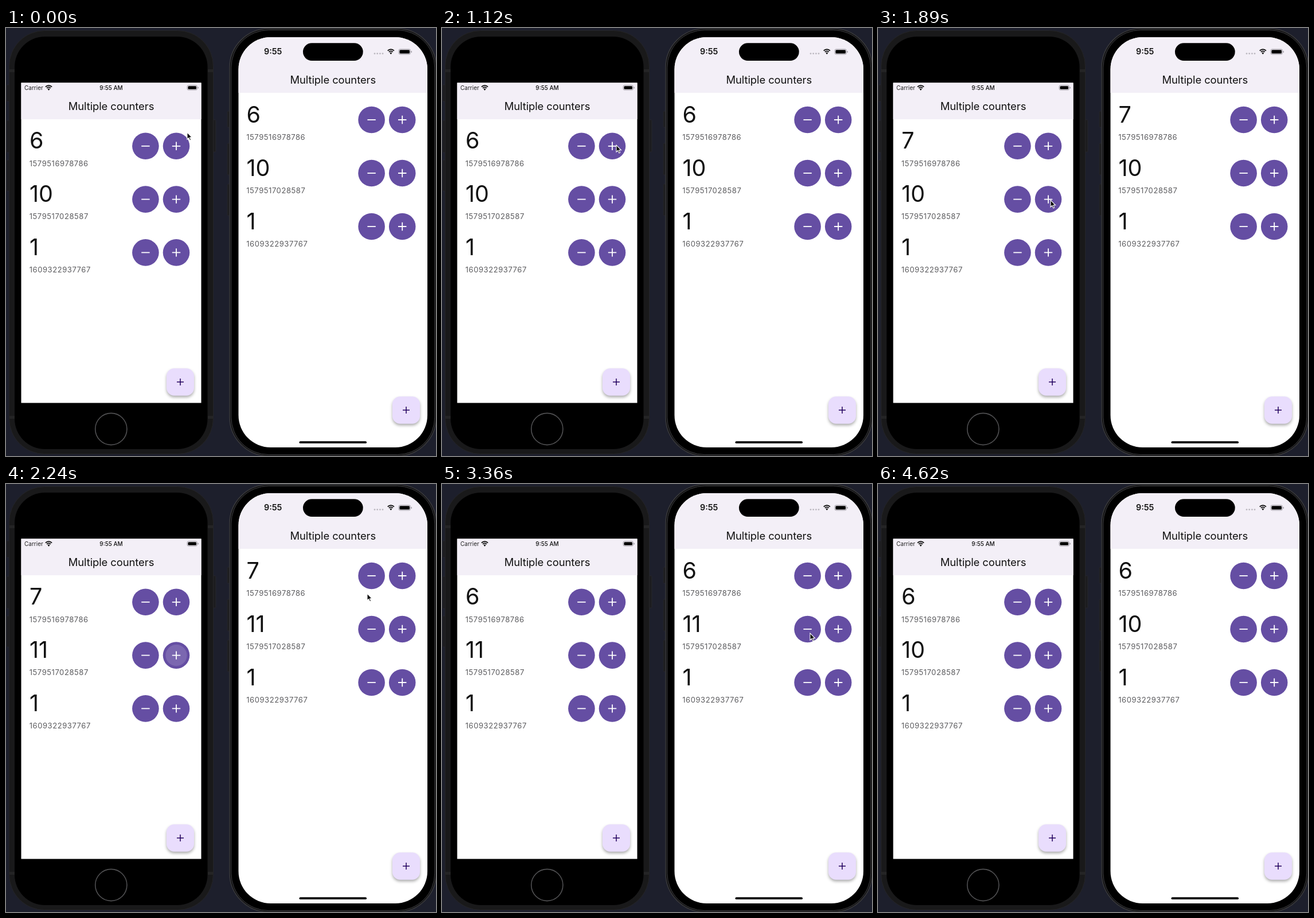
Recreate the animation shown at these times as an HTML page. Size 750 by 746 pixels, loop 4.69 s.

```html
<!DOCTYPE html>
<html lang="en">
<head>
<meta charset="utf-8">
<title>Multiple counters</title>
<style>
  html, body { margin: 0; width: 100%; height: 100%; overflow: hidden; background: #1d1f2c; }
  svg { display: block; width: 750px; height: 746px; font-family: Inter, sans-serif; fill: #111; }
  .title { font-size: 18.4px; text-anchor: middle; letter-spacing: -.07px; }
  .count { font-size: 39.5px; }
  .id { font-size: 13px; letter-spacing: .57px; fill: #5b5b5e; }
  .button { fill: #654ea3; }
  .ripple { fill: #fff; }
  .icon { fill: none; stroke: #fff; stroke-width: 1.8; }
  .fab { fill: #e9ddfd; filter: drop-shadow(0 3px 2.5px rgba(0, 0, 0, .32)); }
</style>
</head>
<body>
<svg id="stage" viewBox="0 0 750 746"></svg>
<script>
const LOOP = 4690, STEP = 70;
const ids = ['1579516978786', '1579517028587', '1609322937767'];
const start = [6, 10, 1];
const taps = [
  { time: 1230, phone: 0, row: 0, delta: 1 },
  { time: 2000, phone: 0, row: 1, delta: 1 },
  { time: 2800, phone: 1, row: 0, delta: -1 },
  { time: 3500, phone: 1, row: 1, delta: -1 },
];
// time, x, y
const path = [
  [140, 316, 182], [700, 304, 204], [1260, 304, 204], [1470, 300, 222],
  [1820, 301, 300], [2020, 301, 300], [2240, 630, 191], [2600, 647, 160],
  [2940, 647, 160], [3290, 642, 260], [3640, 642, 260], [4060, 770, 330],
];

const rect = (x, y, w, h, r, fill, extra = '') =>
  `<rect x="${x}" y="${y}" width="${w}" height="${h}" rx="${r}" fill="${fill}" ${extra}/>`;
const text = (cls, x, y, value, extra = '') =>
  `<text class="${cls}" x="${x}" y="${y}" ${extra}>${value}</text>`;

const wifi = (x, y) => `<g transform="translate(${x} ${y})">
  <path d="M-5.6-1.7A8 8 0 0 1 5.6-1.7M-3.4.5A4.9 4.9 0 0 1 3.4.5" fill="none" stroke="#111" stroke-width="1.9"/>
  <path d="M0 4.6L-2 2.1A3 3 0 0 1 2 2.1Z"/></g>`;

const battery = (x, y, w, h) =>
  rect(x, y, w, h, 2.6, 'none', 'stroke="#98959c" stroke-width=".9"') +
  rect(x + 1.4, y + 1.4, w - 2.8, h - 2.8, 1.5, '#000') +
  rect(x + w + 1, y + h / 2 - 1.5, 1.3, 3, .6, '#98959c');

const roundButton = (phone, row, x, y, sign) => `<g transform="translate(${x} ${y})">
  <circle class="button" r="23.3"/>
  <circle class="ripple" id="ripple${phone}${row}${sign}" r="0"/>
  <path class="icon" d="M-7.2 0H7.2${sign > 0 ? 'M0-7.2V7.2' : ''}"/></g>`;

const row = (phone, i, textX, buttonX, y) =>
  text('count', textX, y + 4.5, start[i], `id="count${phone}${i}"`) +
  text('id', textX - .3, y + 34.7, ids[i]) +
  roundButton(phone, i, buttonX, y, -1) +
  roundButton(phone, i, buttonX + 53.6, y, 1);

const rows = (phone, textX, buttonX, y, pitch) =>
  ids.map((_, i) => row(phone, i, textX, buttonX, y + i * pitch)).join('');

const fab = (x, y) => rect(x - 24, y - 23.7, 48, 47.4, 13.5, '#e9ddfd', 'class="fab"') +
  `<path d="M${x - 6} ${y}h12m-6-6v12" fill="none" stroke="#21005d" stroke-width="1.5"/>`;

const sideButton = (x, y, h) => rect(x, y, 5, h, 1.5, '#1c1c1f', 'stroke="#2c2c31" stroke-width=".7"');

const leftPhone =
  sideButton(1, 99, 29) + sideButton(1, 161, 56) + sideButton(1, 230, 54) + sideButton(361, 160, 56) +
  rect(5.5, 4.5, 356, 738, 62, '#19191a', 'stroke="#252527"') +
  [72, 676].map(y => rect(6, y, 9, 5, 0, '#242425') + rect(352, y, 9, 5, 0, '#242425')).join('') +
  rect(15, 15, 336.5, 719, 53, '#000') +
  rect(26.5, 95.5, 314, 558, 0, '#fff') +
  rect(26.5, 95.5, 314, 63.5, 0, '#f3eff7') +
  text('', 32, 108, 'Carrier', 'font-size="10" fill="#222"') + wifi(74.5, 104.3) +
  text('', 183.5, 108, '9:55 AM', 'font-size="10" font-weight="500" text-anchor="middle"') +
  battery(316, 99.8, 17.5, 8.4) +
  text('title', 183.5, 142.7, 'Multiple counters') +
  rows(0, 41, 243.4, 205.8, 92.8) + fab(304, 617) +
  `<circle cx="183.3" cy="699" r="27.6" fill="#000" stroke="#505052" stroke-width="1.6"/>`;

const rightPhone =
  sideButton(386, 145, 28) + sideButton(386, 201, 55) + sideButton(386, 272, 55) +
  rect(390, 1, 360.5, 745, 68, '#101011', 'stroke="#38383b" stroke-width="1.6"') +
  rect(392.8, 3.6, 355, 740, 65.5, '#000', 'stroke="#454548" stroke-width=".9"') +
  `<clipPath id="screen">${rect(405.5, 16, 329.5, 715, 56, '#fff')}</clipPath>` +
  `<g clip-path="url(#screen)">${rect(405, 16, 331, 716, 0, '#fff')}${rect(405, 16, 331, 97, 0, '#f3eff7')}</g>` +
  rect(518, 26.3, 104.7, 30.6, 15.3, '#000') +
  text('', 450, 46.4, '9:55', 'font-size="14.4" font-weight="600"') +
  [643, 647.7, 652.4, 657].map(x => `<circle cx="${x}" cy="44.6" r="1.4" fill="#bab7bf"/>`).join('') +
  wifi(671.3, 41.3) + battery(685, 36.9, 20.5, 9) +
  text('title', 570.3, 96.7, 'Multiple counters') +
  rows(1, 419.5, 637.6, 160, 93) + fab(698, 666) +
  rect(511.5, 720.3, 117.5, 3.8, 1.9, '#000');

const stage = document.getElementById('stage');
stage.innerHTML = rect(0, 0, 750, 746, 0, '#1d1f2c') + leftPhone + rightPhone +
  `<path id="cursor" d="M0 0V12L2.8 9.5 4.7 13.9 6.6 13.1 4.8 8.8H8.5Z" fill="#000" stroke="#fff" stroke-width="1.1"/>`;

const find = id => document.getElementById(id);
const cursor = find('cursor');
const clamp = v => Math.max(0, Math.min(1, v));

function cursorAt(t) {
  const next = path.findIndex(p => p[0] > t);
  if (next === 0) return path[0].slice(1);
  if (next < 0) return path[path.length - 1].slice(1);
  const [t0, x0, y0] = path[next - 1], [t1, x1, y1] = path[next];
  const k = (t - t0) / (t1 - t0), e = k * k * (3 - 2 * k);
  return [x0 + (x1 - x0) * e, y0 + (y1 - y0) * e];
}

function draw(t) {
  const counts = [...start];
  for (const { time, phone, row, delta } of taps) {
    const age = t - time;
    if (age >= 70) counts[row] += delta;
    const ripple = find(`ripple${phone}${row}${delta}`);
    ripple.setAttribute('r', 23.3 * clamp(age / 300));
    ripple.setAttribute('opacity', .14 * clamp((480 - age) / 180));
  }
  counts.forEach((n, i) => [0, 1].forEach(phone => find(`count${phone}${i}`).textContent = n));
  cursor.setAttribute('transform', `translate(${cursorAt(t)})`);
}

const origin = performance.now();
function tick() {
  const t = (performance.now() - origin) % LOOP;
  draw(Math.floor(t / STEP) * STEP);
  requestAnimationFrame(tick);
}
tick();
</script>
</body>
</html>
```
